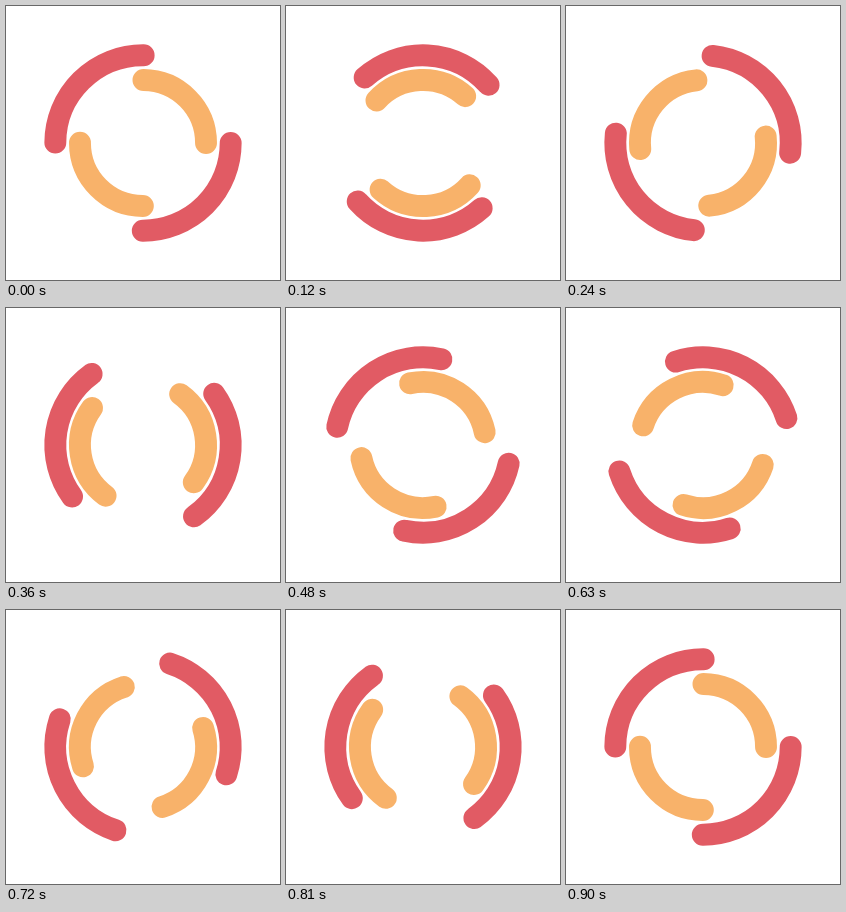
An HTML page for the animation above (930 ms loop, 274 by 274 pixels).

```html
<!DOCTYPE html>
<html lang="en">
<head>
<meta charset="utf-8">
<title>Double ring spinner</title>
<style>
  html, body { margin: 0; height: 100%; overflow: hidden; background: #fff; }
  svg { display: block; width: 100%; height: 100%; }
  circle { fill: none; stroke-width: 8; stroke-linecap: round; }
</style>
</head>
<body>
<svg viewBox="-50 -50 100 100">
  <circle id="outer" r="32" stroke="#e15b64" stroke-dasharray="50.265"/>
  <circle id="inner" r="23" stroke="#f8b26a" stroke-dasharray="36.128" stroke-dashoffset="36.128"/>
</svg>
<script>
  const STEP_MS = 30, STEPS = 31, STEP_DEG = 12;
  const outer = document.getElementById('outer');
  const inner = document.getElementById('inner');

  // A full turn in 30 steps; the closing pose is held for one extra step.
  function draw() {
    const step = Math.floor(performance.now() / STEP_MS + 0.01) % STEPS;
    const angle = step * STEP_DEG;
    outer.setAttribute('transform', `rotate(${angle})`);
    inner.setAttribute('transform', `rotate(${-angle})`);
    requestAnimationFrame(draw);
  }
  draw();
</script>
</body>
</html>
```
